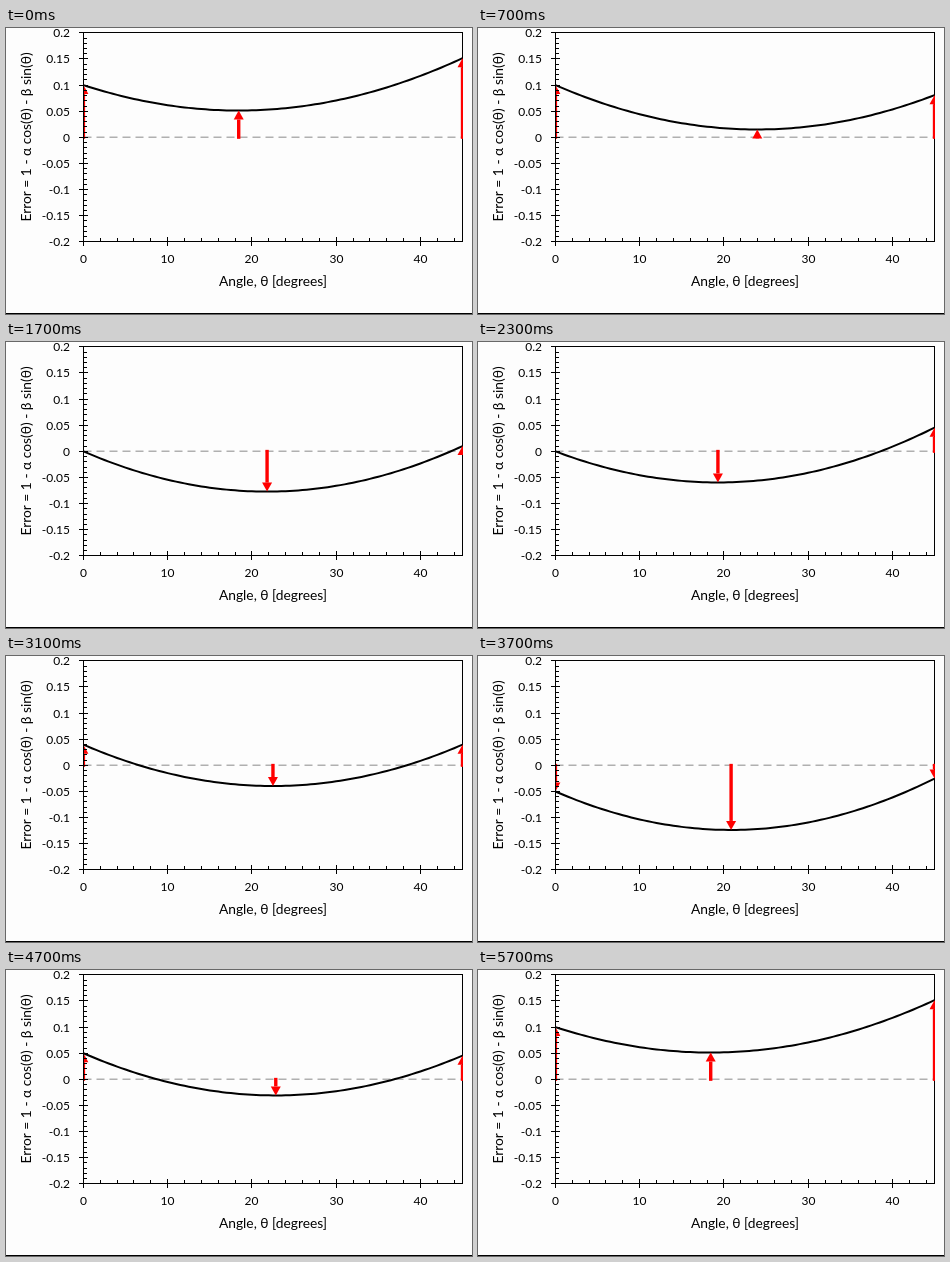
An HTML page with a canvas that plays this animation: 466x286 px, repeating every 6 s.

```html
<!DOCTYPE html>
<html lang="en">
<head>
<meta charset="utf-8">
<title>Approximation error against angle</title>
<style>
  html, body { margin: 0; width: 100%; height: 100%; overflow: hidden; background: #fdfdfd; }
  canvas { display: block; }
</style>
</head>
<body>
<canvas id="stage" width="466" height="286"></canvas>
<script>
const ctx = document.getElementById('stage').getContext('2d');
const LEFT = 77.5, RIGHT = 456.5, TOP = 4.5, BOTTOM = 213.5, ZERO = 109.35;
const FONT = 'Lato, "Noto Sans", sans-serif';
const LOOP = 6000;

// [alpha, beta] pairs, played forwards and then backwards.
const steps = [
  [0.9, 0.3], [0.9, 0.35], [0.9, 0.4], [0.95, 0.4], [0.98, 0.4],
  [1, 0.4], [1.05, 0.4], [1, 0.35], [0.9604, 0.3978]
];

const xOf = degrees => 77.4 + degrees * 8.425;
const yOf = error => ZERO - error * 522.5;
const crisp = v => Math.floor(v) + 0.5;

function line(x1, y1, x2, y2, color = '#000', width = 1) {
  ctx.strokeStyle = color;
  ctx.lineWidth = width;
  ctx.beginPath();
  ctx.moveTo(x1, y1);
  ctx.lineTo(x2, y2);
  ctx.stroke();
}

function text(label, x, y, size, align) {
  ctx.font = `${size}px ${FONT}`;
  ctx.textAlign = align;
  ctx.fillStyle = '#000';
  ctx.fillText(label, x, y);
}

function drawBorder() {
  ctx.strokeStyle = '#000';
  ctx.lineWidth = 1;
  ctx.strokeRect(LEFT, TOP, RIGHT - LEFT, BOTTOM - TOP);
  line(0, 285.5, 466, 285.5);
}

function drawAxes() {
  line(LEFT, TOP, LEFT, BOTTOM);
  for (let i = -20; i <= 20; i++) {
    const y = crisp(yOf(i / 100));
    const major = i % 5 === 0;
    line(major ? 73 : LEFT, y, major ? 82 : 81, y);
    if (major) text(String(i / 100), 64, y + 4, 12, 'right');
  }
  for (let degrees = 0; degrees <= 44; degrees += 2) {
    const x = crisp(xOf(degrees));
    const major = degrees % 10 === 0;
    line(x, major ? 209 : 210, x, major ? 218 : BOTTOM);
    if (major) text(String(degrees), x, 235, 12, 'center');
  }

  text('Angle, θ [degrees]', 267, 258, 13.8, 'center');
  ctx.save();
  ctx.translate(25, 109);
  ctx.rotate(-Math.PI / 2);
  text('Error = 1 - α cos(θ) - β sin(θ)', 0, 0, 13.8, 'center');
  ctx.restore();
}

function drawArrow(degrees, error) {
  if (Math.abs(error) < 0.001) return;
  const x = xOf(degrees), tip = yOf(error);
  const up = Math.sign(error);
  const neck = tip + up * 9;
  const base = ZERO + up * 1.5;
  if ((base - neck) * up > 0) line(x, base, x, neck, '#f00', 3.4);
  ctx.fillStyle = '#f00';
  ctx.beginPath();
  ctx.moveTo(x, tip);
  ctx.lineTo(x - 5, neck);
  ctx.lineTo(x + 5, neck);
  ctx.fill();
}

function drawError([alpha, beta]) {
  const errorAt = degrees => {
    const angle = degrees * Math.PI / 180;
    return 1 - alpha * Math.cos(angle) - beta * Math.sin(angle);
  };
  const lowest = Math.atan2(beta, alpha) * 180 / Math.PI;

  ctx.save();
  ctx.beginPath();
  ctx.rect(77, 4, 380, 210);
  ctx.clip();

  ctx.setLineDash([8, 5]);
  line(LEFT, ZERO, RIGHT, ZERO, '#b0b0b0', 1.5);
  ctx.setLineDash([]);

  ctx.strokeStyle = '#000';
  ctx.lineWidth = 2;
  ctx.beginPath();
  for (let degrees = 0; degrees <= 45; degrees += 0.5) {
    ctx.lineTo(xOf(degrees), yOf(errorAt(degrees)));
  }
  ctx.stroke();

  for (const degrees of [0, lowest, 45]) drawArrow(degrees, errorAt(degrees));
  ctx.restore();
}

function draw(now) {
  // Three steps per second, switched on tenths of a second.
  const tenths = Math.floor((now % LOOP) / 100);
  const index = Math.floor(tenths * 0.3 + 0.15);
  ctx.fillStyle = '#fdfdfd';
  ctx.fillRect(0, 0, 466, 286);
  drawBorder();
  drawError(steps[Math.min(index, 17 - index)]);
  drawAxes();
}

function tick() {
  draw(performance.now());
  requestAnimationFrame(tick);
}
tick();
</script>
</body>
</html>
```
